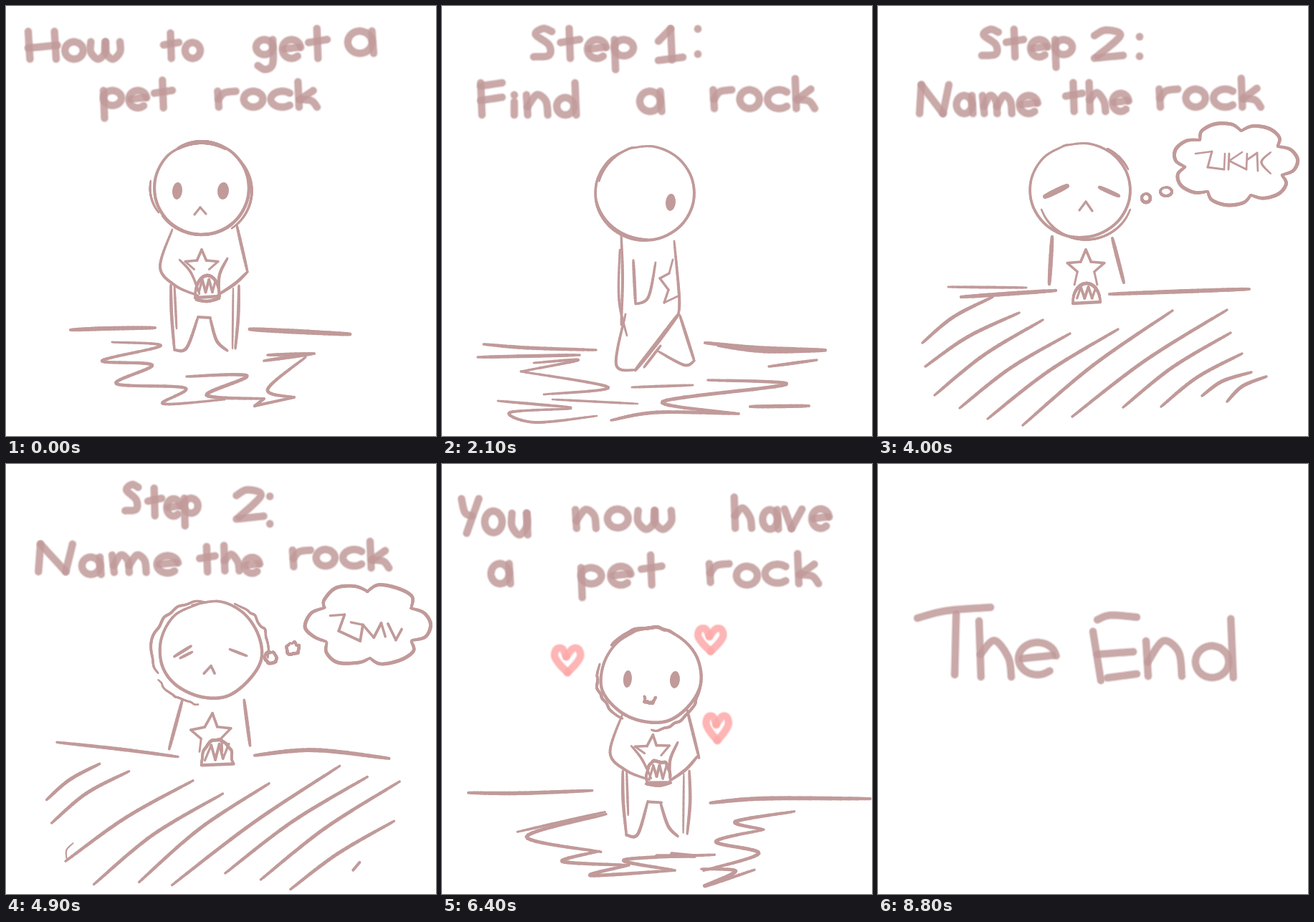
An HTML page with a canvas that plays this animation: 600x600 px, repeating every 9.1 s.

```html
<!DOCTYPE html>
<html lang="en">
<head>
<meta charset="utf-8">
<title>How to get a pet rock</title>
<style>
html, body { margin: 0; width: 100%; height: 100%; overflow: hidden; background: #fff; }
canvas { display: block; width: 100vw; height: 100vh; }
</style>
</head>
<body>
<canvas id="stage" width="600" height="600"></canvas>
<script>
const ctx = document.getElementById('stage').getContext('2d');
const INK = '#c19a9a', PINK = '#fda9a9';

// Seeded looseness, so every drawing depends on its index alone.
let seed = 1, loose = 0;
function random() {
  seed = (seed * 16807) % 2147483647;
  return seed / 2147483647;
}
const shake = size => loose * size * (random() * 2 - 1);
const pairs = n => Array.from({ length: n.length >> 1 }, (_, i) => [n[2 * i], n[2 * i + 1]]);

// Catmull-Rom curve through the points.
function smooth(p, steps = 10) {
  const out = [p[0]];
  for (let i = 0; i < p.length - 1; i++) {
    const a = p[i - 1] || p[i], b = p[i], c = p[i + 1], d = p[i + 2] || c;
    for (let s = 1; s <= steps; s++) {
      const t = s / steps;
      out.push([0, 1].map(k => b[k] + .5 * t * (c[k] - a[k] +
        t * (2 * a[k] - 5 * b[k] + 4 * c[k] - d[k] + t * (3 * b[k] - a[k] - 3 * c[k] + d[k])))));
    }
  }
  return out;
}

function oval(cx, cy, rx, ry, from = -110, to = 255) {
  return Array.from({ length: 13 }, (_, i) => {
    const a = (from + (to - from) * i / 12) * Math.PI / 180;
    return [cx + rx * Math.cos(a), cy + ry * Math.sin(a)];
  });
}

// Pen line that thins towards both ends.
function pen(width, points, steps = 10) {
  const p = smooth(points.map(([x, y]) => [x + shake(1.8), y + shake(1.8)]), steps);
  const last = p.length - 1;
  for (let i = 0; i < last; i++) {
    ctx.lineWidth = width * (.6 + .4 * Math.sqrt(Math.sin(Math.PI * (i + .5) / last)));
    ctx.beginPath();
    ctx.moveTo(...p[i]);
    ctx.lineTo(...p[i + 1]);
    ctx.stroke();
  }
}
const curve = (width, ...n) => pen(width, pairs(n), 12);
const lines = (width, ...n) => pen(width, pairs(n), 1);
const arc = (width, ...n) => pen(width, oval(...n));
function dot(x, y, rx, ry) {
  ctx.beginPath();
  ctx.ellipse(x, y, rx, ry, .08, 0, 7);
  ctx.fill();
}
function part(paint) {
  ctx.save();
  ctx.translate(shake(3), shake(3));
  paint();
  ctx.restore();
}

// Letter strokes in a unit box.
const path = (...n) => pairs(n);
const stem = (x = 0) => path(x, 0, x + .06, 1);
const bar = y => path(0, y + .05, 1, y - .05);
const bowl = (cy = .5, ry = .5, r = .5) => oval(r, cy, r, ry, -60, -420);
const arch = (l, r, top = 0) => path(l, .6, l * .55 + r * .45, top, r * .9 + l * .1, top + .3, r, 1);
const cup = (l, r) => path(l, 0, l, .6, (l + r) / 2, 1, r, .6, r, 0);
const glyphs = {
  H: () => [stem(), stem(.9), bar(.55)],
  o: () => [bowl()],
  w: () => [cup(0, .5), cup(.5, 1)],
  t: () => [stem(.45), bar(.42)],
  g: () => [bowl(.25, .25, .45), path(.9, 0, .9, .8, .5, 1, .1, .87)],
  e: () => [path(.1, .5, .9, .4), oval(.5, .5, .5, .5, -10, -310)],
  a: () => [bowl(.5, .5, .42), stem(.84)],
  p: () => [stem(), bowl(.27, .27)],
  r: () => [stem(.05), path(.1, .5, .4, .1, 1, 0)],
  c: () => [oval(.6, .5, .6, .5, -50, -310)],
  k: () => [stem(), path(.8, .35, .1, .7), path(.1, .7, .7, .75, 1, 1)],
  S: () => [path(.95, .1, .5, 0, .1, .2, .8, .55, .8, .9, 0, .95)],
  1: () => [path(0, .4, .5, 0), stem(.5), bar(.97)],
  2: () => [path(0, .2, .4, 0, .9, .2, .1, .95), bar(.97)],
  F: () => [stem(), bar(.05), bar(.5)],
  i: () => [path(.5, .35, .5, 1), path(.5, 0, .52, .02)],
  n: () => [stem(), arch(.05, 1)],
  d: () => [bowl(.73, .27, .4), stem(.85)],
  N: () => [path(0, 1, .06, 0), path(.06, 0, .8, 1), path(.8, 1, 1, 0)],
  m: () => [stem(), arch(.05, .5), arch(.5, 1)],
  h: () => [stem(), arch(.04, 1, .35)],
  Y: () => [path(0, 0, .2, .4, .6, .5), path(1, 0, .3, 1)],
  u: () => [cup(0, .85), stem(.85)],
  v: () => [path(0, 0, .4, 1), path(.4, 1, 1, 0)],
  T: () => [path(0, .16, .4, .05, 1, 0), path(.53, .1, .51, 1)],
  E: () => [path(.1, .07, .4, 0, 1, .03), path(0, .25, .18, 1), path(.1, .6, .92, .56), path(.33, .96, 1, .9)],
  ':': () => [path(0, 0, 0, .01), path(0, 1, 0, 1.01)],
  '*': () => [1, -1].map(s => path(.45, .35, .5 + s * .2, .03, .5 + s * .42, .04, .5 + s * .5, .32, .5 + s * .32, .65, .5, 1))
};

function letter(ch, x, y, w, h, color = INK) {
  ctx.strokeStyle = color;
  const dx = x + shake(3), dy = y + shake(3);
  for (const stroke of glyphs[ch]()) {
    const line = new Path2D();
    smooth(stroke).forEach(([u, v]) => line.lineTo(dx + u * w, dy + v * h));
    for (const [width, alpha] of [[12, .4], [9, .75]]) {
      ctx.lineWidth = width;
      ctx.globalAlpha = alpha;
      ctx.stroke(line);
    }
    ctx.globalAlpha = 1;
  }
  ctx.strokeStyle = INK;
}

const widthOf = ch => ch === 'i' ? .3 : 'wmHN'.includes(ch) ? 1.6 : 1;
// Fits a handwritten word on a baseline; size is the height of a small letter.
function word(text, x, base, width, size) {
  const gap = .42, chars = [...text];
  const unit = width / (chars.reduce((sum, ch) => sum + widthOf(ch) + gap, 0) - gap);
  for (const ch of chars) {
    const tall = 'HtdkSFNYh12:'.includes(ch), low = 'pg'.includes(ch);
    const h = size * (tall || low ? 1.6 : 1);
    letter(ch, x, base - (low ? size : h), unit * widthOf(ch), h);
    x += unit * (widthOf(ch) + gap);
  }
}

function star(cx, cy, r, reach) {
  pen(3.8, Array.from({ length: 2 * reach + 1 }, (_, i) => {
    const k = i - reach, a = k * Math.PI / 5, d = k % 2 ? r * .46 : r;
    return [cx + d * Math.sin(a), cy - d * Math.cos(a)];
  }), 1);
}

function rock(cx, base, rx, ry) {
  arc(4.5, cx, base, rx, ry, 180, 360);
  lines(4.5, cx - rx, base + 2, cx + rx, base);
  pen(4, Array.from({ length: 6 }, (_, i) =>
    [cx + rx * (i / 3.6 - .7), base - ry * (i % 2 ? .8 : .2)]), 1);
}

function standing(dx, dy) {
  ctx.translate(dx, dy);
  curve(4, 232, 312, 215, 364, 236, 390, 268, 404);
  curve(3.5, 242, 354, 258, 372, 270, 402);
  curve(4.5, 322, 306, 337, 371);
  curve(4.5, 337, 371, 320, 387, 296, 403);
  curve(4.2, 309, 352, 298, 375, 297, 402);
  star(273, 364, 24, 3);
  rock(281, 405, 17, 29);
  curve(4.5, 265, 410, 281, 412, 298, 408);
  curve(4.5, 230, 389, 231, 430, 235, 480);
  curve(3.5, 235, 390, 238, 450);
  curve(4.5, 235, 480, 252, 477, 268, 434);
  lines(4, 268, 434, 285, 435);
  curve(4.5, 285, 436, 294, 467, 309, 481);
  curve(4.5, 325, 390, 324, 434, 320, 478);
  curve(3, 317, 394, 316, 478);
}

function cloud(cx, cy, rx, ry, bumps, turn) {
  const at = (k, f) => {
    const a = turn + k * 2 * Math.PI / bumps;
    return [cx + f * rx * Math.cos(a), cy + f * ry * Math.sin(a)];
  };
  for (let k = 0; k < bumps; k++) {
    pen(5, [at(k, .84), at(k + .2, 1), at(k + .5, 1.06), at(k + .8, 1), at(k + 1, .84)]);
  }
}

function hatch(x1, y1, x2, y2) {
  curve(5, x1, y1, (x1 + x2) / 2 - 6, (y1 + y2) / 2 - 4, x2, y2);
}

function titleA() {
  word('How', 31, 74, 128, 24);
  word('to', 220, 73, 51, 22);
  word('get', 349, 73, 99, 26);
  word('a', 477, 66, 40, 31);
  word('pet', 136, 142, 96, 24);
  word('rock', 294, 141, 140, 22);
  part(() => {
    curve(6, 90, 452, 140, 450, 208, 449);
    curve(7, 340, 451, 400, 454, 480, 458);
    curve(4.5, 148, 469, 216, 474, 134, 495, 204, 501, 154, 527, 250, 533, 219, 555, 305, 549);
    curve(5, 252, 517, 336, 516, 280, 543, 360, 548);
    lines(4.5, 360, 548, 347, 558, 402, 546);
    curve(4.5, 418, 490, 365, 535, 402, 546);
    curve(5, 365, 487, 430, 485);
    curve(5, 360, 495, 430, 485);
  });
  part(() => {
    arc(4.5, 273, 254, 66, 65);
    arc(3, 268, 254, 67, 60, 145, 190);
    arc(6, 273, 256, 66, 66, 240, 300);
    arc(3.5, 277, 258, 66, 64, -50, 55);
    arc(4, 273, 257, 67, 62, 50, 145);
    dot(239, 258, 7, 12);
    dot(303, 258, 8, 12);
    lines(3.5, 263, 291, 271, 281, 279, 290);
    standing(0, 0);
  });
}

function titleB() {
  word('How', 38, 80, 136, 28);
  word('to', 232, 69, 56, 21);
  word('get', 342, 75, 104, 27);
  word('a', 481, 78, 36, 32);
  word('pet', 146, 147, 116, 25);
  word('rock', 309, 144, 155, 24);
  part(() => {
    curve(6, 89, 453, 110, 447, 208, 451);
    curve(8, 348, 447, 400, 452, 489, 459);
    curve(5, 373, 470, 428, 471);
    curve(5, 186, 471, 124, 501, 204, 505, 150, 541, 250, 556);
    curve(5, 243, 530, 332, 524, 277, 561, 356, 561);
    curve(5, 331, 510, 418, 498, 399, 531, 439, 536);
  });
  part(() => {
    arc(4.5, 267, 255, 67, 63);
    curve(3.5, 186, 272, 215, 203, 284, 186);
    arc(3, 271, 255, 68, 65, -55, -8);
    arc(3.5, 270, 257, 68, 62, 75, 160);
    dot(240, 255, 6, 11);
    dot(305, 256, 7, 10);
    lines(3.5, 264, 286, 274, 275, 281, 286);
    standing(-1, 1);
  });
}

function find(index) {
  word('Step', 128, 73, 139, 26);
  word('1', 302, 75, 34, 27);
  word(':', 357, 67, 5, 22);
  word('Find', 54, 152, 136, 28);
  word('a', 276, 147, 34, 28);
  word('rock', 377, 143, 143, 26);
  part(() => {
    curve(5, 58, 472, 120, 477, 215, 480);
    curve(5, 50, 490, 192, 487);
    curve(6, 367, 470, 440, 477, 535, 480);
    curve(5, 385, 474, 450, 482, 535, 481);
    curve(4.5, 456, 503, 523, 494);
    curve(4, 128, 498, 190, 494, 110, 510);
    curve(4, 110, 510, 232, 532, 142, 542);
    curve(3.5, 154, 549, 273, 555);
    curve(4, 78, 551, 180, 560);
    curve(4, 180, 562, 95, 567, 130, 581, 216, 572);
    curve(4, 265, 532, 350, 529);
    curve(5, 371, 522, 480, 528, 308, 552, 414, 569);
    curve(5, 414, 569, 300, 567, 236, 578);
    curve(5.5, 430, 559, 512, 558);
  });
  part(() => {
    arc(4, 283, 261, 69, 66);
    arc(3, 285, 262, 68, 67, 195, 255);
    arc(5, 286, 260, 72, 66, 90, 170);
    dot(319, 274, 7, 12);
    curve(4, 250, 318, 252, 380, 250, 445);
    curve(3.5, 248, 340, 247, 410, 258, 460);
    curve(4, 324, 328, 331, 405, 330, 430);
    curve(4.5, 267, 355, 270, 415);
    curve(4, 270, 416, 288, 406, 298, 358);
    lines(3.5, 322, 354, 317, 373, 304, 380, 316, 396, 310, 414, 331, 404);
    // The legs open and close with every other drawing.
    const stride = index % 2 ? 1 : .55;
    ctx.translate(292 * (1 - stride), 0);
    ctx.scale(stride, 1);
    curve(4, 256, 430, 243, 500, 270, 508);
    curve(6, 270, 508, 300, 470, 330, 430);
    curve(4, 282, 504, 305, 474);
    curve(4.5, 332, 432, 352, 495);
    curve(4, 352, 495, 338, 501, 302, 482);
  });
}

function nameA() {
  word('Step', 145, 71, 126, 24);
  word('2', 302, 72, 40, 24);
  word(':', 365, 70, 6, 17);
  word('Name', 58, 150, 165, 25);
  word('the', 262, 147, 88, 25);
  word('rock', 391, 141, 143, 25);
  part(() => {
    curve(4, 98, 392, 207, 393);
    curve(6, 116, 406, 248, 397);
    curve(6, 323, 402, 430, 398, 518, 395);
    hatch(62, 470, 160, 406);
    hatch(66, 503, 197, 428);
    hatch(79, 543, 230, 438);
    hatch(114, 561, 268, 457);
    hatch(153, 576, 335, 451);
    hatch(202, 585, 411, 425);
    hatch(271, 573, 487, 424);
    hatch(342, 560, 492, 456);
    hatch(395, 559, 508, 485);
    hatch(452, 544, 521, 511);
    hatch(487, 552, 542, 517);
  });
  part(() => {
    arc(4, 282, 257, 70, 66);
    arc(3, 284, 256, 72, 66, -60, -25);
    arc(3.5, 290, 262, 66, 64, 20, 160);
    curve(8, 233, 266, 264, 251);
    curve(6, 309, 253, 336, 265);
    lines(3.5, 281, 285, 290, 273, 299, 286);
    curve(6, 243, 322, 239, 388);
    curve(5.5, 327, 324, 343, 386);
    star(290, 367, 27, 4);
    rock(291, 413, 19, 26);
  });
  part(() => {
    cloud(498, 220, 83, 55, 7, .35);
    arc(4.5, 374, 268, 6, 6);
    arc(4, 402, 259, 8, 6);
    lines(3, 443, 206, 466, 203, 460, 225, 483, 228, 484, 206);
    lines(3, 490, 206, 489, 228);
    lines(3, 508, 204, 490, 216, 514, 228, 515, 206);
    lines(3, 516, 214, 529, 205, 530, 230);
    curve(3, 548, 204, 535, 218, 548, 234);
  });
}

function nameB() {
  word('Step', 169, 70, 100, 24);
  word('2', 319, 78, 38, 25);
  word(':', 370, 84, 1, 24);
  word('Name', 48, 152, 192, 24);
  word('the', 272, 151, 82, 22);
  word('rock', 398, 143, 138, 23);
  part(() => {
    curve(5, 70, 387, 160, 394, 241, 405);
    curve(6, 346, 406, 430, 398, 534, 407);
    hatch(58, 468, 129, 415);
    hatch(64, 498, 172, 427);
    curve(2, 95, 527, 83, 538, 84, 551);
    hatch(84, 551, 260, 440);
    hatch(122, 583, 302, 458);
    hatch(186, 582, 368, 442);
    hatch(233, 587, 467, 420);
    hatch(306, 567, 504, 434);
    hatch(355, 577, 549, 441);
    hatch(397, 593, 542, 495);
    lines(4, 485, 563, 493, 554);
  });
  part(() => {
    arc(4.5, 284, 258, 71, 68);
    arc(4, 276, 258, 74, 68, 150, 270);
    arc(3.5, 294, 258, 70, 68, -70, 10);
    arc(3, 272, 262, 70, 72, 95, 150);
    curve(4.5, 235, 268, 258, 253);
    curve(4, 240, 269, 260, 259);
    curve(4, 309, 257, 334, 268);
    lines(4, 274, 289, 283, 279, 291, 289);
    curve(5, 244, 331, 225, 398);
    curve(5, 330, 329, 339, 391);
    star(285, 377, 29, 4);
    rock(293, 418, 22, 35);
  });
  part(() => {
    cloud(507, 223, 82, 55, 6, .5);
    arc(4.5, 371, 269, 8, 8);
    arc(4.5, 402, 256, 8, 8);
    lines(4, 455, 212, 475, 209, 466, 232, 495, 246, 500, 222, 482, 218);
    lines(4, 500, 222, 515, 242, 525, 222, 532, 238);
    lines(4, 533, 222, 547, 243, 553, 228);
  });
}

function have() {
  word('You', 28, 98, 93, 30);
  word('now', 189, 90, 128, 26);
  word('have', 410, 92, 128, 27);
  word('a', 68, 169, 30, 28);
  word('pet', 195, 169, 109, 26);
  word('rock', 371, 168, 153, 26);
  letter('*', 160, 258, 36, 34, PINK);
  letter('*', 357, 229, 35, 32, PINK);
  letter('*', 368, 349, 31, 34, PINK);
  part(() => {
    curve(5.5, 38, 462, 110, 460, 208, 457);
    curve(6, 376, 475, 450, 468, 598, 469);
    curve(4, 107, 514, 228, 488);
    curve(5, 228, 489, 119, 523, 221, 543);
    curve(5, 221, 543, 168, 557, 261, 562);
    curve(5, 261, 562, 208, 575, 325, 569);
    curve(5, 325, 569, 254, 553, 381, 548);
    lines(6, 322, 545, 352, 548, 300, 550);
    curve(5, 491, 486, 411, 501, 448, 513);
    curve(5, 448, 513, 381, 530, 444, 545, 365, 568);
    curve(5, 361, 567, 410, 570, 366, 592, 438, 570);
  });
  part(() => {
    arc(4.5, 292, 295, 70, 66);
    arc(4, 288, 300, 72, 64, 120, 200);
    arc(5, 290, 296, 70, 68, 220, 300);
    arc(4, 291, 302, 70, 70, 0, 90);
    dot(259, 300, 6, 12);
    dot(325, 301, 7, 12);
    arc(4.5, 290, 325, 7, 9, 180, 0);
    standing(21, 38);
  });
}

function end() {
  letter('T', 55, 200, 102, 94);
  letter('h', 141, 219, 45, 78);
  letter('e', 196, 249, 53, 45);
  letter('E', 300, 211, 61, 91);
  letter('n', 374, 247, 50, 49);
  letter('d', 443, 216, 58, 82);
}

// "~" is a looser redraw of the same pose.
const scenes = { A: titleA, B: titleB, F: find, M: nameA, N: nameB, V: have, E: end };
const order = 'A ~B ~A ~A B ~F ~F F ~F ~F ~F M ~N ~M ~N ~M N ~V ~V ~V ~V ~V V ~E ~E ~E ~E E'.split(' ');
const STEP = 300, HOLD = 10, HOLD_MS = 1000, LOOP = 9100;

function draw(index) {
  const name = order[index];
  loose = name[0] === '~' ? 1 : 0;
  seed = 7919 * (index + 3);
  ctx.fillStyle = '#fff';
  ctx.fillRect(0, 0, 600, 600);
  ctx.lineCap = ctx.lineJoin = 'round';
  ctx.fillStyle = ctx.strokeStyle = INK;
  scenes[name.slice(-1)](index);
}

function indexAt(t) {
  const holdStart = HOLD * STEP, holdEnd = holdStart + HOLD_MS;
  if (t < holdStart) return Math.floor(t / STEP);
  if (t < holdEnd) return HOLD;
  return HOLD + 1 + Math.floor((t - holdEnd) / STEP);
}

const start = performance.now();
let shown = -1;
function tick() {
  const index = indexAt((performance.now() - start) % LOOP);
  if (index !== shown) draw(shown = index);
  requestAnimationFrame(tick);
}
tick();
</script>
</body>
</html>
```
